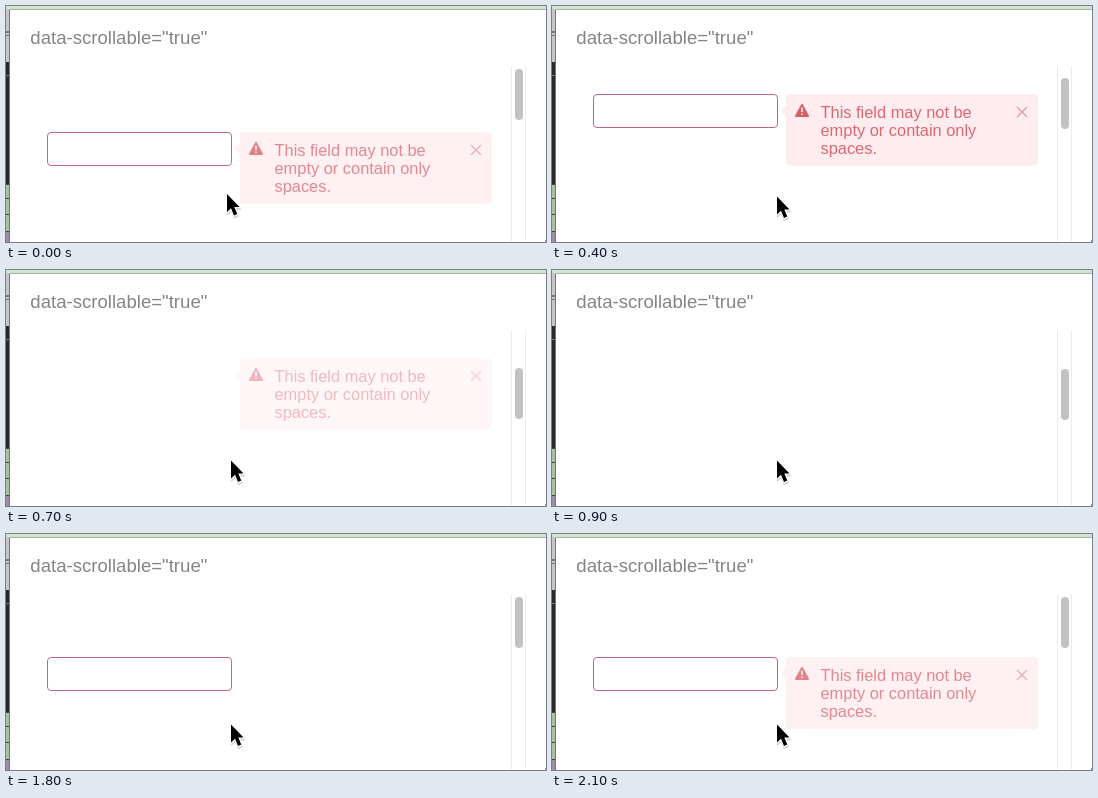
An HTML page that plays this animation: 540x236 px, repeating every 2.2 s.

```html
<!DOCTYPE html>
<html lang="en">
<head>
<meta charset="utf-8">
<title>Scrollable form field</title>
<style>
  html, body { margin: 0; width: 100%; height: 100%; overflow: hidden; background: #fff; }
  svg { display: block; width: 540px; height: 236px; }
  text { font-family: "Liberation Sans", Arial, sans-serif; }
</style>
</head>
<body>
<svg viewBox="0 0 540 236">
  <clipPath id="view"><rect x="5" y="60" width="500" height="176"/></clipPath>

  <!-- page behind the dialog -->
  <rect width="4" height="56" fill="#c6c6c8"/>
  <path d="M0 25h3v2h-3zM0 29h3v1h-3z" fill="#77777a"/>
  <rect y="56" width="4" height="122" fill="#29292b"/>
  <rect y="69" width="3" height="1" fill="#777"/>
  <rect y="178" width="4" height="48" fill="#a5c3a3"/>
  <rect y="226" width="4" height="10" fill="#9b8fa8"/>
  <path d="M0 178.500h4M0 192.500h4M0 208.500h4M0 225.500h4" stroke="#444"/>
  <rect width="540" height="3" fill="#d0e5cf"/>
  <path d="M4 3.500H540" stroke="#a3b0a2"/>
  <path d="M3.500 4V236" stroke="#777"/>
  <rect x="539" y="234" width="1" height="2" fill="#999"/>

  <text x="24.300" y="38" font-size="18.600" fill="#858585">data-scrollable="true"</text>
  <path d="M505.500 60V236M519.500 60V236" stroke="#ececec"/>
  <rect id="thumb" x="509" width="8" height="51" rx="4" fill="#c2c2c2"/>

  <g clip-path="url(#view)">
    <rect id="field" x="41.500" y=".5" width="184" height="33" rx="3.500" fill="#fff" stroke="#c0697a"/>
  </g>

  <g id="bubble">
    <path d="M234 11.500L228.500 17L234 22.500z" fill="#ffecef"/>
    <rect x="234" width="252" height="72" rx="4" fill="#ffecef"/>
    <path d="M250 11L256 22H244z" fill="#d65f6c" stroke="#d65f6c" stroke-width="2" stroke-linejoin="round"/>
    <path d="M250 13.500V18M250 19.500V21" stroke="#ffecef" stroke-width="1.600"/>
    <g font-size="16.400" fill="#d96874">
      <text x="268.500" y="24">This field may not be</text>
      <text x="268.500" y="42">empty or contain only</text>
      <text x="268.500" y="60">spaces.</text>
    </g>
    <path d="M465 13L475 23M475 13L465 23" stroke="#e09aa3" stroke-width="1.300"/>
  </g>

  <g id="cursor" stroke-linejoin="round">
    <path d="M0 0V18L4 14.200L7 21.500L10.300 20L7.300 13H12.500Z" fill="#000" opacity=".16" transform="translate(.5 2)" stroke="#000" stroke-width="2"/>
    <path d="M0 0V18L4 14.200L7 21.500L10.300 20L7.300 13H12.500Z" stroke="#fff" stroke-width="2" paint-order="stroke"/>
  </g>
</svg>
<script>
  const LOOP = 2200, STEP = 100, TOP = 123, PINNED = 88;
  // scroll offset and bubble opacity, one value per step
  const scroll = [-3, 0, 3, 14, 35, 85, 128, 135, 138, 140, 140,
                  140, 140, 140, 128, 85, 35, 8, 0, 0, 0, 0];
  const fade = [.78, .9, 1, 1, 1, .95, .78, .45, .15, 0, 0,
                0, 0, 0, 0, 0, 0, 0, 0, .2, .5, .78];
  const part = id => document.getElementById(id);
  const move = (id, x, y) => part(id).setAttribute("transform", `translate(${x} ${y})`);

  function draw(now) {
    const i = Math.floor(now % LOOP / STEP);
    const y = TOP - scroll[i];
    move("field", 0, y);
    move("bubble", 0, Math.max(PINNED, y));
    part("bubble").setAttribute("opacity", fade[i]);
    move("thumb", 0, 63 + Math.round(Math.max(0, scroll[i]) * 36 / 140));
    move("cursor", i ? 225 : 221, i ? 190.500 : 188);
    requestAnimationFrame(draw);
  }
  draw(performance.now());
</script>
</body>
</html>
```
